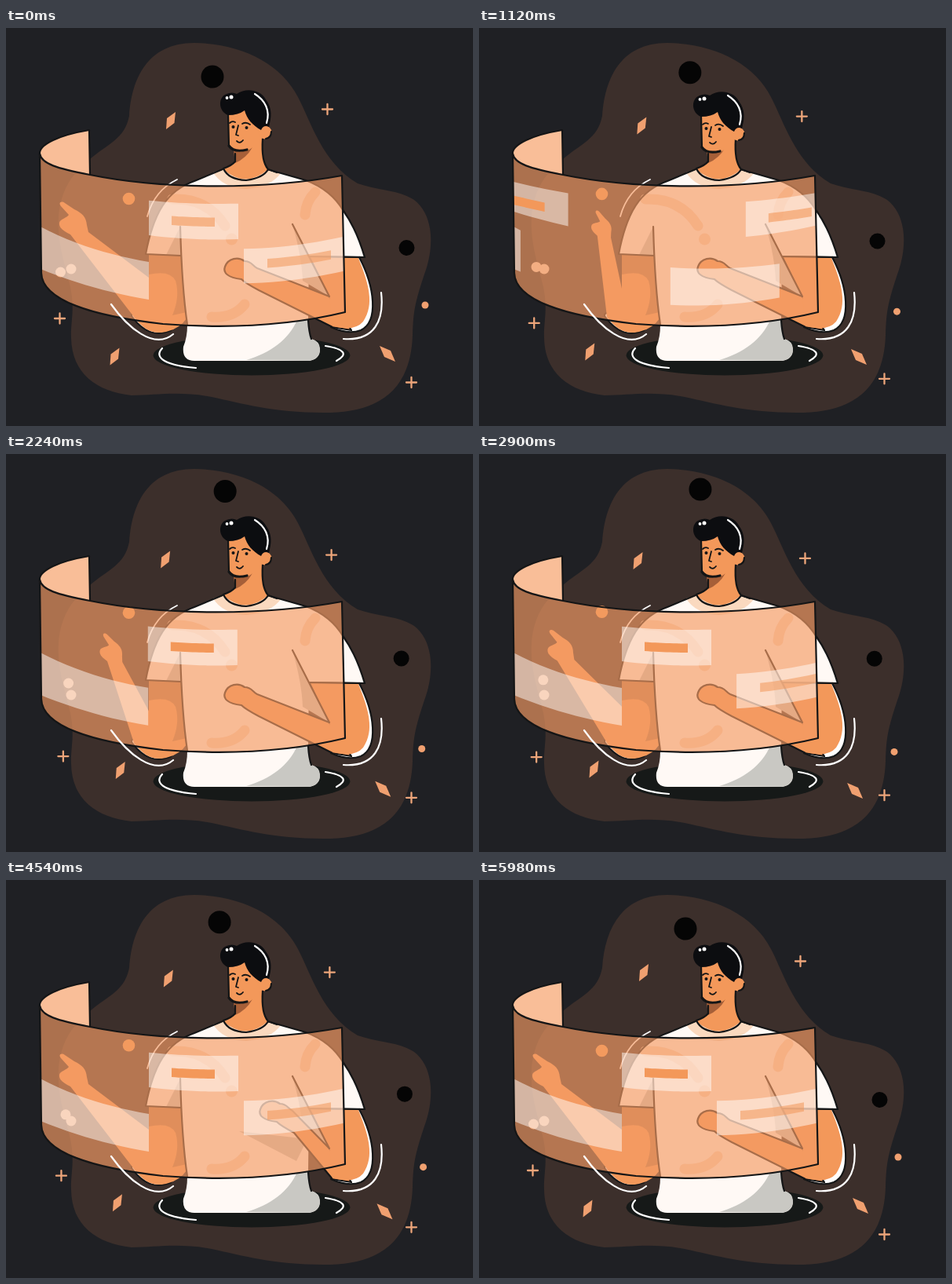
Animation of 595 by 507 pixels, one loop 6 s. Source, as an HTML page:

```html
<!DOCTYPE html>
<html>
<head>
<meta charset="utf-8">
<style>
html, body { margin: 0; width: 100%; height: 100%; overflow: hidden; background: #1f2024; }
svg { display: block; }
.ink { fill: none; stroke: #141516; stroke-width: 2.2; stroke-linecap: round; stroke-linejoin: round; }
.white { fill: none; stroke: #fff; stroke-width: 2.2; stroke-linecap: round; }
.skin { fill: #f3985a; }
.shade { fill: #c9c8c3; }
.soft { fill: none; stroke: #fad9bf; stroke-width: 13; stroke-linecap: round; }
.plus { fill: none; stroke: #eda57a; stroke-width: 2.3; stroke-linecap: round; }
.gem { fill: #f0a070; }
</style>
</head>
<body>
<svg width="595" height="507" viewBox="0 0 595 507">
  <defs>
    <path id="screen" d="M43,160 C45,173 65,179 107,187 C200,206 330,206 428,188 L432,362 C370,377 290,384 200,377 C110,367 46,347 45,312 Z"/>
    <clipPath id="clip"><use href="#screen"/></clipPath>
  </defs>

  <path fill="#3c2f2b" d="M107,167 C130,147 151,142 157,112 C160,65 180,19 240,19 C300,20 350,45 372,88 C388,118 403,172 448,198 C478,208 500,206 520,219 C545,238 545,278 535,308 C520,352 519,362 518,392 C515,470 465,490 405,490 C340,490 300,478 262,470 C220,462 190,468 160,468 C115,463 84,440 83,395 C82,375 88,360 82,330 C75,300 65,275 67,240 C70,205 85,185 107,167Z"/>
  <g id="floats"></g>

  <ellipse cx="313" cy="417" rx="125.500" ry="25.500" fill="#161918"/>
  <path class="white" d="M199,408 C190,417 195,429 242,433 M407,405 C432,409 436,416 421,424"/>
  <path class="white" style="stroke-width:1.800" d="M180,240 Q189,207 218,193"/>

  <!-- arm on the left -->
  <path class="ink" style="stroke-width:8" d="M163,366 C178,386 192,389 208,383"/>
  <path class="white" style="stroke-width:4" d="M163,366 C178,386 192,389 208,383"/>
  <path id="armL" class="skin"/>
  <path fill="#b8774a" d="M182,288 L226,290 L230,362 L212,366 Q222,342 216,322 Q209,308 182,314Z"/>

  <!-- shirt -->
  <path fill="#fff9f5" d="M276,180 L240,195 C205,207 188,235 178,288 L223,290 Q226,340 231,378 Q231,394 226,406 Q224,424 240,424 L386,424 Q400,422 400,409 Q399,399 389,396 Q386,388 385,372 L386,291 L457,292 Q446,255 430,233 Q414,206 382,194 L333,180 Q305,202 276,180Z"/>
  <path class="shade" d="M222,253 L204,289 L223,290Z M365,250 L412,342 L378,322 Q377,292 365,250Z M297,320 L370,358 L384,330Z M385,372 Q386,388 389,396 Q400,399 400,409 Q400,422 386,424 L306,423 C337,414 360,397 371,372Z"/>
  <path fill="#fad9bf" d="M276,180 L264,184 Q275,203 306,205 Q338,202 350,185 L333,180 Q305,202 276,180Z"/>
  <path class="soft" d="M212,218 Q256,216 279,252 M381,238 Q382,221 394,209 M262,368 Q290,370 304,352"/>
  <circle cx="287.500" cy="269" r="7.500" fill="#fad9bf"/>
  <path class="ink" d="M276,180 L240,195 C205,207 188,235 178,288 L223,290 M222,253 Q224,330 231,378 M333,180 L382,194 Q414,206 430,233 Q446,255 457,292 L386,291 M385,372 Q386,388 389,396"/>

  <!-- arm on the right -->
  <path class="ink" style="fill:#fff" d="M450,292 C470,330 475,374 452,385 Q436,391 414,381"/>
  <path id="armR" class="skin" stroke="#141516" stroke-width="2.200" stroke-linejoin="round"/>
  <path class="skin" d="M388,292 L449,293 C462,325 470,352 455,374 Q444,387 416,380 L412,342Z"/>
  <path class="ink" d="M386,291 L457,292 M365,250 L412,342"/>

  <!-- neck -->
  <path class="skin" d="M293,150 L293,170 L277,180 Q305,205 334,180 Q325,172 327,135Z"/>
  <path fill="#a65f38" d="M290,156 Q304,160 314,152 Q306,166 292,172Z"/>
  <path class="ink" d="M277,179 Q283,193 306,194 Q328,191 334,180 M327,141 Q325,170 334,180 L345,184 M292,160 L292,170 Q288,175 277,179"/>

  <g id="head">
    <path class="skin" d="M283,108 L284,150 Q292,160 308,156 Q326,146 328,130 L324,100Z"/>
    <circle class="skin" cx="330" cy="133" r="8.500"/>
    <path class="ink" d="M283,110 L284,150 M331,141 Q338,140 338,132"/>
    <path class="ink" style="stroke-width:3.200" d="M284,150 Q290,159 307,155"/>
    <path fill="#0c0d10" d="M283,111 C270,106 270,88 281,84 Q288,81 294,84 C305,76 324,78 331,91 C340,103 338,114 335,126 Q328,123 325,130 C314,124 307,116 304,105 Q296,111 283,111Z"/>
    <path class="white" d="M317,84 C330,92 337,105 332,121"/>
    <g fill="#fff"><circle cx="281.500" cy="89" r="1.900"/><circle cx="287" cy="88" r="2.500"/></g>
    <g fill="#141516"><circle cx="289.500" cy="126" r="2"/><circle cx="306.500" cy="127" r="2"/></g>
    <path class="ink" style="stroke-width:1.800" d="M285,121 Q288,118 292,120 M301,122 Q306,119 311,123 M296,124 L293,136 L296,137 M294,144 Q298,148 302,143"/>
  </g>

  <!-- curved display -->
  <path fill="#f9be98" d="M106,130 C70,136 40,148 43,162 C46,174 75,182 107,187Z"/>
  <path class="ink" d="M43,162 C40,148 70,136 106,130 L107,187"/>
  <use href="#screen" fill="#f59b65" fill-opacity=".66"/>
  <g id="dots"></g>
  <g clip-path="url(#clip)">
    <g id="panels"></g>
  </g>
  <use href="#screen" class="ink"/>

  <path class="white" d="M134,352 C154,380 188,411 213,390 M478,337 C482,372 470,399 430,396"/>
</svg>
<script>
const LOOP = 6000;
const $ = id => document.getElementById(id);
const add = (parent, tag, attrs) => {
  const el = document.createElementNS('http://www.w3.org/2000/svg', tag);
  for (const k in attrs) el.setAttribute(k, attrs[k]);
  return $(parent).appendChild(el);
};
const clamp = u => Math.max(0, Math.min(1, u));
const ease = u => (1 - Math.cos(Math.PI * clamp(u))) / 2;
const span = (t, a, b) => ease((t - a) / (b - a));
// out to 1 at the peak time, back to 0 at the end of the loop
const sway = (t, peak) => t < peak ? ease(t / peak) : ease((LOOP - t) / (LOOP - peak));
// cubic settling from 1 to 0
const settle = (t, a, b) => (1 - clamp((t - a) / (b - a))) ** 3;

// drifting parts: x, y, dx, dy, peak time
const floats = [];
const drift = (parent, tag, attrs, ...move) => floats.push([add(parent, tag, attrs), ...move]);
const plus = { class: 'plus', d: 'M-6.500,0H6.500M0,-6.500V6.500' };
const gem = d => ({ class: 'gem', d });
drift('floats', 'circle', { r: 14.5, fill: '#050505' }, 263, 62, 19, -17, 3000);
drift('floats', 'circle', { r: 10, fill: '#050505' }, 510.5, 280, -7, -20, 2480);
drift('floats', 'circle', { r: 4.5, fill: '#f0a070' }, 534, 353, -5, 26.5, 3000);
drift('floats', 'path', plus, 409.5, 103.5, 6, 29.5, 3000);
drift('floats', 'path', plus, 68.5, 370, 4.7, 16.2, 2700);
drift('floats', 'path', plus, 516.5, 451.5, 0, -17.2, 3200);
drift('floats', 'path', gem('M6,-11L4.500,3L-6,11L-5,-3Z'), 210, 118, -7.5, 18, 2750);
drift('floats', 'path', gem('M6,-11L4.500,3L-6,11L-5,-3Z'), 138.5, 418.5, 8, -17, 2800);
drift('floats', 'path', gem('M-10,-10L4,-4L10,10L-4,4Z'), 486, 415, -7, 14.2, 3100);
drift('dots', 'circle', { r: 7.8, fill: '#f39a5e' }, 156.5, 217.5, 0, -16.5, 2700);
drift('dots', 'circle', { r: 6.5, fill: '#f3ae82' }, 69.5, 311, 12.5, -23.5, 3150);
drift('dots', 'circle', { r: 6.5, fill: '#f3ae82' }, 83, 307, 0, 0, 3000);

// a strip of the display between two curves
const band = (x0, x1, top, bottom) => {
  const pts = [], n = 12;
  for (let i = 0; i <= n; i++) {
    const x = x0 + (x1 - x0) * i / n;
    pts.push([x, top(x)]);
    pts.unshift([x, bottom(x)]);
  }
  return 'M' + pts.join('L') + 'Z';
};
const topA = x => 224 - .00055 * (x - 270) ** 2;
const lowA = x => 269.5 - .0007 * (x - 270) ** 2;
const topL = x => 306.5 - .0007 * (x - 290) ** 2 - 3e-9 * (x - 290) ** 4;
const lowL = x => 353.5 - .00087 * (x - 275) ** 2;
const topR = x => 281.5 - .0008 * (x - 290) ** 2;
const shift = (f, d) => x => f(x) + d;

const pane = () => add('panels', 'path', { fill: '#fff', 'fill-opacity': .48 });
const bar = alpha => add('panels', 'path', { fill: '#f3985a', 'fill-opacity': alpha });
const makeSet = alpha => ({ L: pane(), A: pane(), bar: bar(alpha) });
const leaving = makeSet(.6), coming = makeSet(1);
const paneR = pane(), barR = bar(.55);
const setPath = (el, d) => el.setAttribute('d', d);

function drawSet(set, dxA, dxL) {
  const a = 182 + dxA, l = 43 + dxL;
  setPath(set.A, band(a, a + 114, topA, lowA));
  setPath(set.bar, band(a + 29, a + 84, shift(topA, 17.5), shift(topA, 29)));
  setPath(set.L, band(l, l + 139, topL, lowL));
}

function drawPanels(t) {
  const out = span(t, 0, 2200), rest = settle(t, 948, 2500);
  drawSet(leaving, 330 * span(t, 100, 2200), 390 * out);
  drawSet(coming, -260 * rest, -184 * rest);
  const r = 303 + (t < 2200 ? 343 * out : 135 * settle(t, 2300, 3700));
  setPath(paneR, band(r, r + 140, topR, shift(topR, 44)));
  setPath(barR, band(r + 30, r + 111, shift(topR, 14), shift(topR, 25.5)));
  barR.setAttribute('fill-opacity', t < 2200 ? .55 * (1 - span(t, 100, 600)) : .55);
}

function drawArms(t) {
  const p = span(t, 0, 1050) * (1 - span(t, 1350, 3700));
  const a = p * Math.PI / 12, s = 1 - .25 * p, c = Math.cos(a) * s, n = Math.sin(a) * s;
  const h = (x, y) => [92 + 67 * p + x * c - y * n, 258 + 5 * p + x * n + y * c];
  setPath($('armL'), `M207,386 C190,392 175,385 163,368 L${h(-10, 5)}
    C${h(-18, 1)} ${h(-25, -3)} ${h(-24, -10)} C${h(-23, -15)} ${h(-14, -16)} ${h(-12, -20)}
    L${h(-22, -31)} C${h(-26, -36)} ${h(-21, -38)} ${h(-17, -35)} L${h(-5, -27)}
    C${h(5, -22)} ${h(10, -18)} ${h(11, -7)} L${h(13, 2)} L182,${318 + 14 * p}
    L182,288 L226,290 L230,370 Q222,382 207,386Z`);

  const q = span(t, 3700, 4550) * (1 - span(t, 4650, 5700));
  const f = (x, y) => [x + 45 * q, y - 12 * q];
  setPath($('armR'), `M412,342 L${f(320, 306)} C${f(314, 303)} ${f(313, 297)} ${f(304, 297)}
    C${f(296, 291)} ${f(283, 293)} ${f(279, 304)} C${f(276, 312)} ${f(283, 318)} ${f(300, 320)}
    Q${f(305, 325)} ${f(322, 334)} L416,381 L440,385Z`);
}

function draw() {
  const t = performance.now() % LOOP;
  for (const [el, x, y, dx, dy, peak] of floats) {
    const k = sway(t, peak);
    el.setAttribute('transform', `translate(${x + dx * k},${y + dy * k})`);
  }
  const nod = span(t, 800, 1400) * (1 - span(t, 1600, 2200));
  $('head').setAttribute('transform', `translate(0,${3.5 * nod})`);
  drawPanels(t);
  drawArms(t);
  requestAnimationFrame(draw);
}
draw();
</script>
</body>
</html>
```
